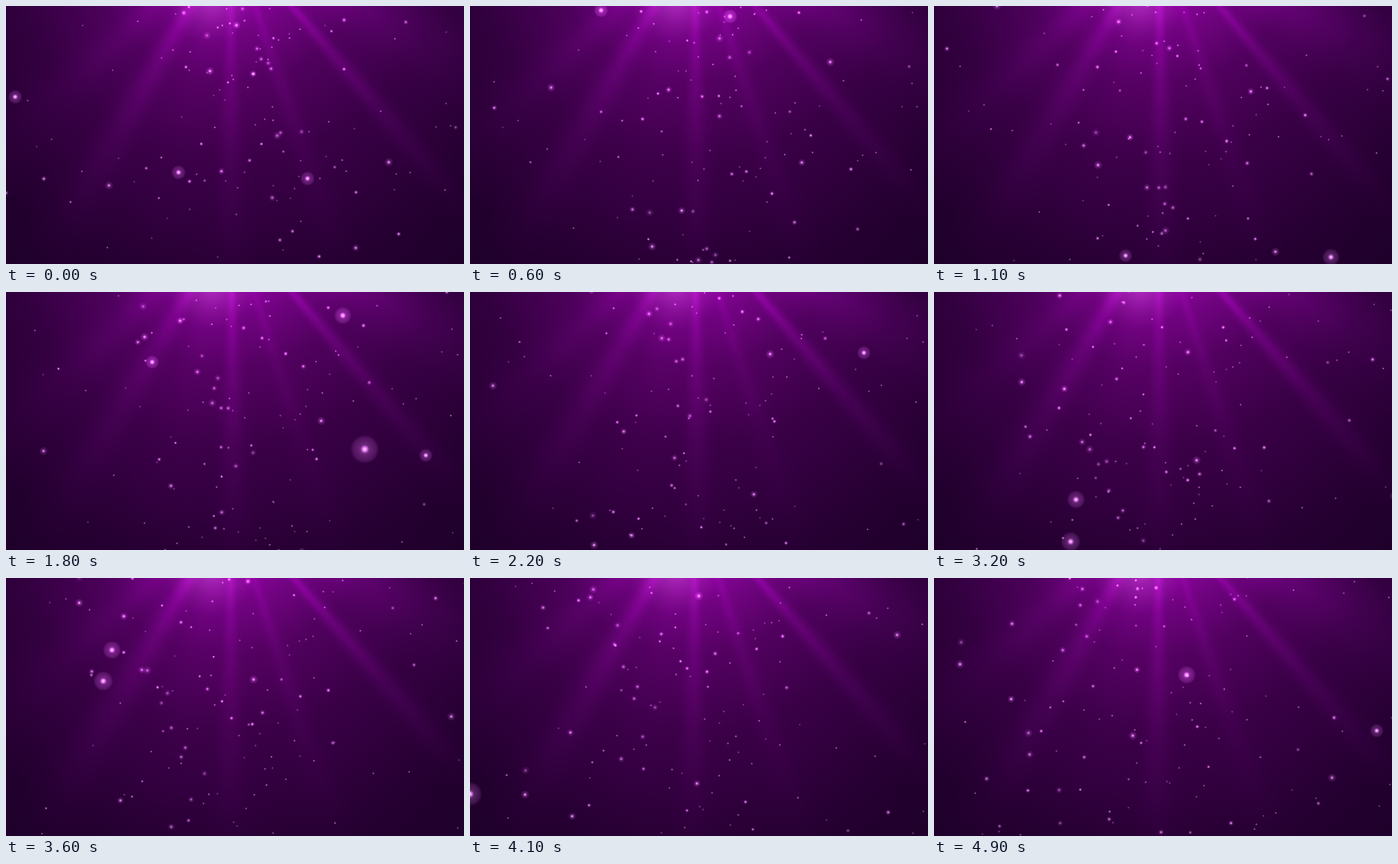
Write an HTML page with a canvas that moves like this. It is 600x338 px and loops after 5 s.

```html
<!DOCTYPE html>
<html lang="en">
<head>
<meta charset="utf-8">
<title>Purple light and dust</title>
<style>
  html, body { margin: 0; width: 100%; height: 100%; overflow: hidden; background: #23002f; }
  canvas { display: block; width: 100vw; height: 100vh; }
</style>
</head>
<body>
<canvas id="stage" width="600" height="338"></canvas>
<script>
const W = 600, H = 338, LOOP = 5000, STEP = 100;
const LIGHT = { x: 295, y: -94 };
const ctx = document.getElementById('stage').getContext('2d');
const layer = document.createElement('canvas');
layer.width = W;
layer.height = H;
const lc = layer.getContext('2d');

// Beams: angle from straight down, strength, spread (degrees)
const BEAMS = [
  [-47, .2, 4], [-30, .38, 3], [-14, .1, 7], [0, .36, 2],
  [18, .2, 2], [40.6, .5, 1.7], [62, .42, 7]
];

// Nearest grains: a moment in seconds, the place then, and the radius
const NEAR = [
  [0, 395, 226, 9.5], [0, 226, 218, 9.5], [0, 12, 119, 9.5],
  [1.1, 520, 329, 11.5], [1.1, 251, 327, 9],
  [1.8, 470, 206, 19], [1.8, 550, 214, 9],
  [2.6, 69, 198, 19], [2.6, 212, 283, 15],
  [3.2, 186, 272, 12], [3.2, 179, 327, 13],
  [4.1, 0, 283, 16], [4.9, 331, 127, 12], [4.9, 580, 200, 9]
];

function random(seed) {
  return () => {
    seed = (seed * 1664525 + 1013904223) >>> 0;
    return seed / 4294967296;
  };
}

const rnd = random(71);
const dust = Array.from({ length: 125 }, (_, i) => ({
  x: i % 5 < 2 ? 300 + (rnd() + rnd() + rnd() - 1.5) * 110 : rnd() * W,
  y: rnd() * H,
  r: .8 + 5 * rnd() ** 3.6,
  a: .4 + .4 * rnd()
}));

// Nearer grains are larger and rise faster, drifting left
const velX = r => 14 - 11 * r;
const velY = r => -(12 + 36 * r);
const wrap = (v, size) => ((v + 10) % (size + 20) + size + 20) % (size + 20) - 10;

function radial(c, x, y, r, stops) {
  const g = c.createRadialGradient(x, y, 0, x, y, r);
  stops.forEach(([p, color]) => g.addColorStop(p, color));
  return g;
}

function fill(c, style) {
  c.fillStyle = style;
  c.fillRect(0, 0, W, H);
}

function beamAt(angle, t) {
  return BEAMS.reduce((sum, [mid, power, spread], i) => {
    const d = (angle - mid - .5 * Math.sin(t * 1.1 + i * 2)) / spread;
    const flicker = 1 + .12 * Math.sin(t * 1.6 + i * 1.9);
    return sum + power * flicker * Math.exp(-d * d / 2);
  }, 0);
}

function drawBeams(t) {
  lc.globalCompositeOperation = 'copy';
  const cone = lc.createConicGradient(0, LIGHT.x, LIGHT.y);
  for (let a = 0; a <= 180; a++) {
    cone.addColorStop(a / 360, `rgba(165,12,180,${beamAt(90 - a, t).toFixed(3)})`);
  }
  fill(lc, cone);
  lc.globalCompositeOperation = 'destination-in';
  fill(lc, radial(lc, LIGHT.x, LIGHT.y, 500, [
    [0, 'rgba(0,0,0,.5)'], [.4, 'rgba(0,0,0,.32)'], [.7, 'rgba(0,0,0,.14)'], [1, 'rgba(0,0,0,0)']
  ]));
  ctx.drawImage(layer, 0, 0);
}

function drawLight(t) {
  ctx.globalCompositeOperation = 'source-over';
  fill(ctx, radial(ctx, 300, 110, 370, [[0, '#32003d'], [.5, '#2a0036'], [1, '#1f002b']]));
  ctx.globalCompositeOperation = 'lighter';
  fill(ctx, radial(ctx, LIGHT.x, LIGHT.y, 450, [
    [0, 'rgba(150,6,160,.72)'], [.21, 'rgba(150,6,160,.6)'], [.28, 'rgba(150,6,160,.45)'],
    [.43, 'rgba(150,4,160,.23)'], [.65, 'rgba(150,2,160,.09)'], [1, 'rgba(150,0,160,0)']
  ]));
  drawBeams(t);
  fill(ctx, radial(ctx, 268, -12, 62, [
    [0, 'rgba(60,80,55,.6)'], [.5, 'rgba(55,55,50,.3)'], [1, 'rgba(50,30,45,0)']
  ]));
}

function disc(x, y, r, stops) {
  ctx.fillStyle = radial(ctx, x, y, r, stops);
  ctx.beginPath();
  ctx.arc(x, y, r, 0, Math.PI * 2);
  ctx.fill();
}

function drawGrain(x, y, r, alpha) {
  if (x < -r || x > W + r || y < -r || y > H + r) return;
  ctx.globalAlpha = alpha;
  if (r > 1.8) {
    disc(x, y, r, [
      [0, 'rgba(205,140,210,.42)'], [.45, 'rgba(195,130,200,.26)'],
      [.8, 'rgba(185,120,190,.17)'], [1, 'rgba(185,120,190,0)']
    ]);
  }
  disc(x, y, 1.4 + .24 * r, [
    [0, 'rgba(240,200,240,.85)'], [.4, 'rgba(225,165,230,.55)'], [1, 'rgba(210,130,215,0)']
  ]);
  ctx.globalAlpha = 1;
}

function drawGrains(t) {
  for (const { x, y, r, a } of dust) {
    drawGrain(wrap(x + velX(r) * t, W), wrap(y + velY(r) * t, H), r, a);
  }
  for (const [t0, x, y, r] of NEAR) {
    drawGrain(x + velX(r) * (t - t0), y + velY(r) * (t - t0), r, .95);
  }
}

function draw(ms) {
  const t = Math.floor((ms % LOOP) / STEP) * STEP / 1000;
  drawLight(t);
  drawGrains(t);
}

const start = performance.now();
function tick() {
  draw(performance.now() - start);
  requestAnimationFrame(tick);
}
tick();
</script>
</body>
</html>
```
